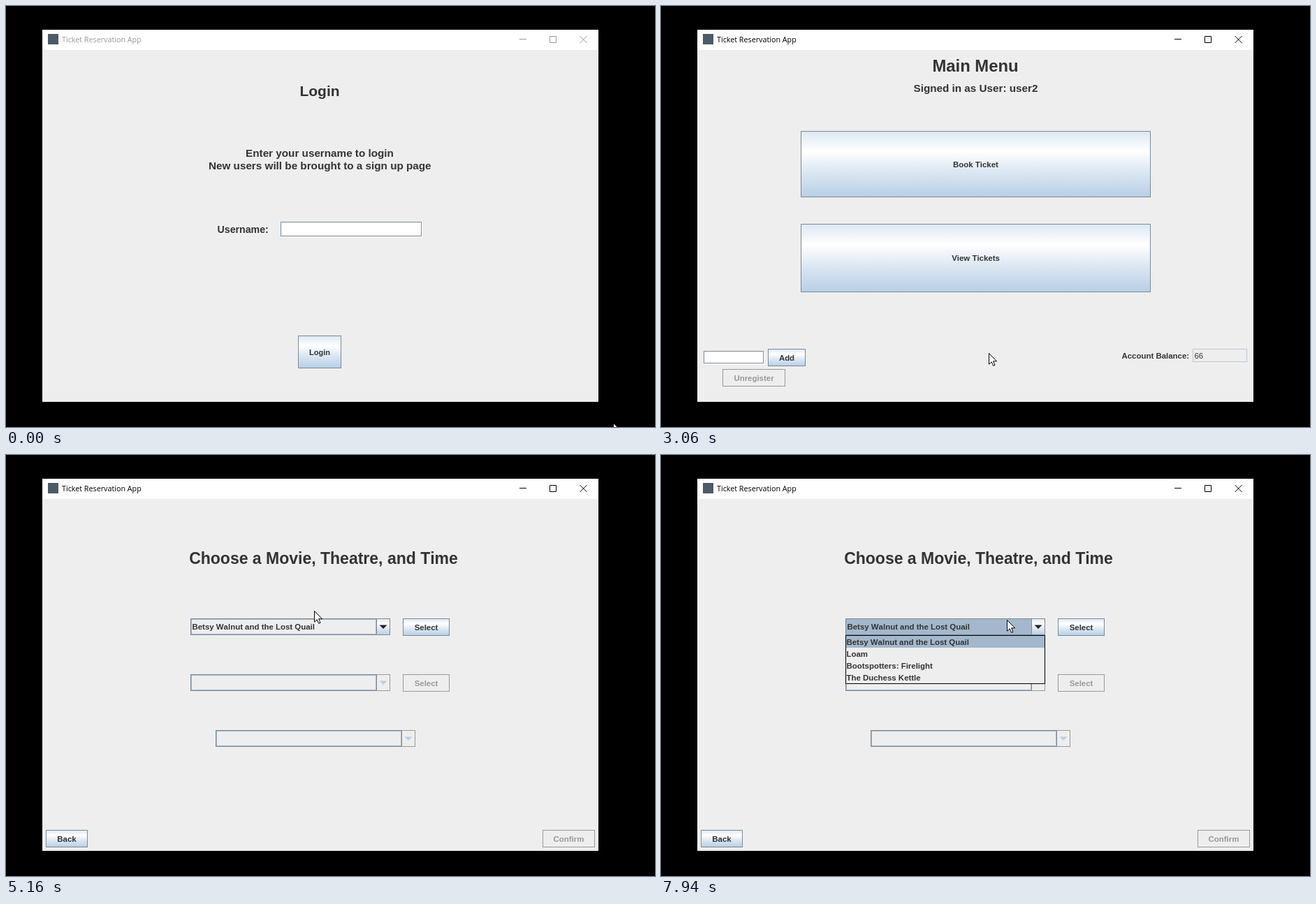
These frames come from a looping animation (929 by 603 pixels, 8 s). An HTML page:

```html
<!DOCTYPE html>
<html lang="en">
<head>
<meta charset="utf-8">
<title>Ticket Reservation App</title>
<style>
  html, body { margin: 0; width: 100%; height: 100%; overflow: hidden; background: #000; }
  svg { display: block; width: 929px; height: 603px; }
  rect { shape-rendering: crispEdges; }
  text { font: bold 11.44px "Liberation Sans", Arial, sans-serif; fill: #333; font-kerning: none; white-space: pre; }
  .caption { font: 10.75px "Open Sans", "Noto Sans", sans-serif; fill: #000; }
  .controls { fill: none; stroke: #000; }
  .inactive .caption { fill: #999; }
  .inactive .controls { stroke: #999; }
</style>
</head>
<body>
<svg id="stage" viewBox="0 0 929 603" xmlns="http://www.w3.org/2000/svg">
  <defs>
    <linearGradient id="ocean" x1="0" y1="0" x2="0" y2="1">
      <stop offset="0" stop-color="#dde8f3"/>
      <stop offset=".3" stop-color="#fff"/>
      <stop offset=".6" stop-color="#dde8f3"/>
      <stop offset="1" stop-color="#b8cfe5"/>
    </linearGradient>
  </defs>
</svg>
<script>
const LOOP = 8000, STEP = 70;
const DARK = '#7a8a99', PALE = '#b8cfe5', PICKED = '#a3b8cc', FACE = '#eee', DIM = '#999';
const TITLES = ['Betsy Walnut and the Lost Quail', 'Loam', 'Bootspotters: Firelight', 'The Duchess Kettle'];

// Pointer path: time, x, y
const PATH = [
  [0, 869, 597], [110, 357, 250], [220, 357, 250], [600, 468, 320], [2400, 468, 320],
  [2640, 426, 490], [2710, 419, 507], [2920, 469, 497], [3460, 469, 497], [3870, 444, 495],
  [4080, 441, 494], [4210, 441, 494], [4820, 445, 267], [4960, 441, 223], [5620, 441, 223],
  [5830, 440, 240], [6230, 440, 240], [6300, 438, 243], [6770, 438, 243], [6910, 505, 231],
  [7030, 578, 238], [7100, 578, 240], [7310, 530, 240], [7870, 495, 236], [LOOP, 495, 236]
];
const KEYSTROKES = [1570, 1670, 1770, 1970, 2370];

const stage = document.getElementById('stage');

function add(parent, tag, attrs = {}) {
  const node = document.createElementNS(stage.namespaceURI, tag);
  for (const name in attrs) node.setAttribute(name, attrs[name]);
  return parent.appendChild(node);
}
const group = (parent, attrs) => add(parent, 'g', attrs);
const fill = (parent, x, y, width, height, color) =>
  add(parent, 'rect', { x, y, width, height, fill: color });
// Outlined box whose border occupies the outermost pixels
const box = (parent, x, y, w, h, color, line) =>
  add(parent, 'rect', { x: x + .5, y: y + .5, width: w - 1, height: h - 1, fill: color, stroke: line });

function label(parent, x, y, string, size, anchor = 'start', style = '') {
  const node = add(parent, 'text', { x, y, 'text-anchor': anchor });
  if (size) node.style.fontSize = size + 'px';
  node.style.cssText += style;
  node.textContent = string;
  return node;
}
const centred = (parent, x, y, string, size) => label(parent, x, y, string, size, 'middle');

function button(parent, x, y, w, h, string, enabled = true, size) {
  const face = box(parent, x, y, w, h, enabled ? 'url(#ocean)' : FACE, enabled ? DARK : DIM);
  const glow = group(parent, { visibility: 'hidden' });
  box(glow, x, y, w, h, 'none', PALE);
  box(glow, x + 1, y + 1, w - 2, h - 2, 'none', '#7a9ac0');
  box(glow, x + 2, y + 2, w - 4, h - 4, 'none', PALE);
  const text = centred(parent, x + w / 2, y + h / 2 + 4.2, string, size);
  if (!enabled) text.style.fill = DIM;
  return {
    update(point, pressed) {
      const over = point[0] >= x && point[0] < x + w && point[1] > y && point[1] < y + h;
      show(glow, over && !pressed);
      face.setAttribute('fill', pressed ? PALE : 'url(#ocean)');
    }
  };
}

function combo(parent, x, y, string) {
  const on = Boolean(string);
  box(parent, x, y, 286, 24, FACE, on ? DARK : DIM);
  box(parent, x + 266, y, 20, 24, on ? 'url(#ocean)' : FACE, on ? DARK : DIM);
  box(parent, x, y, 267, 24, FACE, DARK);
  box(parent, x + 1, y + 1, 265, 22, 'none', PICKED);
  const tint = fill(parent, x + 2, y + 2, 263, 20, PICKED);
  show(tint, false);
  add(parent, 'path', { d: `M${x + 270.5} ${y + 9.5}h11l-5.5 5.5z`, fill: on ? '#222' : PALE });
  if (on) label(parent, x + 2.5, y + 16, string);
  return tint;
}

function show(node, visible) {
  node.setAttribute('visibility', visible ? 'inherit' : 'hidden');
}

// Window frame
const frame = group(stage);
fill(frame, 52, 34, 796, 533, FACE);
fill(frame, 52, 34, 796, 29, '#fff');
fill(frame, 60, 40, 15, 15, '#4d5a68');
add(frame, 'text', { x: 80, y: 52, class: 'caption' }).textContent = 'Ticket Reservation App';
add(frame, 'path', { class: 'controls', d: 'M735 47.5h10M778.5 43.5h9v9h-9zM821.5 43l10 10m0-10l-10 10' });

// Login page
const login = group(stage);
centred(login, 449, 129, 'Login', 20.97);
centred(login, 449, 216, 'Enter your username to login', 15.25);
centred(login, 449.3, 234, 'New users will be brought to a sign up page', 15.25);
label(login, 302.5, 324.5, 'Username:', 14.2);
fill(login, 394, 310, 202, 21, '#fff');
box(login, 393, 309, 202, 21, '#fff', DARK);
const typed = label(login, 394.3, 325, '', 15.25);
const caret = fill(login, 395, 311, 1, 18, '#333');
const loginButton = button(login, 418, 472, 62, 47, 'Login', true, 11);

// Main menu
const menu = group(stage);
centred(menu, 450, 94, 'Main Menu', 23.85);
centred(menu, 450.5, 122.5, 'Signed in as User: user2', 15.25);
const bookButton = button(menu, 200, 179, 501, 95, 'Book Ticket');
const viewButton = button(menu, 200, 312, 501, 98, 'View Tickets');
fill(menu, 62, 495, 86, 18, '#fff');
box(menu, 61, 494, 86, 18, '#fff', DARK);
button(menu, 153, 491, 54, 25, 'Add');
button(menu, 88, 520, 90, 25, 'Unregister', false);
label(menu, 659.5, 505, 'Account Balance:');
box(menu, 761, 491, 78, 19, FACE, '#bcc8d3');
label(menu, 763.5, 505, '66', 11.44, 'start', 'font-weight: normal');

// Booking page
const booking = group(stage);
centred(booking, 454.5, 156, 'Choose a Movie, Theatre, and Time', 23);
const tint = combo(booking, 264, 234, TITLES[0]);
combo(booking, 264, 314);
combo(booking, 300, 394);
const selectButton = button(booking, 568, 234, 67, 25, 'Select');
button(booking, 568, 314, 67, 25, 'Select', false);
button(booking, 57, 537, 60, 25, 'Back');
button(booking, 768, 537, 75, 25, 'Confirm', false);
const popup = group(booking);
box(popup, 264, 258, 286, 70, FACE, '#000');
fill(popup, 265, 259, 284, 17, PICKED);
TITLES.forEach((title, i) => label(popup, 265.5, 272 + 17.1 * i, title));

// Pointers
const arrow = add(stage, 'path', {
  d: 'M.5 .5V16.2L4.2 12.8L6.7 18.3L9 17.3L6.6 11.8H11.6Z', fill: '#fff', stroke: '#000'
});
const beam = add(stage, 'path', { d: 'M-3 -8.5h2.5l.5 .5l.5 -.5h2.5M.5 -8v16M-3 8.5h2.5l.5 -.5l.5 .5h2.5', fill: 'none', stroke: '#000' });

function pointerAt(time) {
  const t = Math.max(0, time);
  const i = PATH.findIndex((key, n) => n && t < key[0]);
  const [t0, x0, y0] = PATH[i - 1], [t1, x1, y1] = PATH[i];
  const part = Math.floor((t - t0) / STEP) * STEP / (t1 - t0);
  return [Math.round(x0 + (x1 - x0) * part), Math.round(y0 + (y1 - y0) * part)];
}

const start = performance.now();

function draw(now) {
  const t = Math.max(0, now - start) % LOOP;
  const during = (from, to) => t >= from && t < to;
  const [x, y] = pointerAt(t);
  const hover = pointerAt(t - STEP);

  frame.setAttribute('class', t < 670 ? 'inactive' : '');
  show(login, t < 3060);
  show(menu, during(3060, 5160));
  show(booking, t >= 5160);

  typed.textContent = 'user2'.slice(0, KEYSTROKES.filter(k => k <= t).length);
  const width = typed.textContent ? typed.getComputedTextLength() : 0;
  caret.setAttribute('x', Math.round(395 + width));
  show(caret, during(670, 1170) || during(1570, 2870));

  loginButton.update(hover, during(2980, 3060));
  bookButton.update(hover, during(5090, 5160));
  viewButton.update(hover, false);
  selectButton.update(hover, false);
  show(popup, during(6100, 6770) || t >= 7940);
  show(tint, during(6030, 6200) || t >= 6770);

  const inField = t < 3060 && x > 393 && x < 595 && y > 309 && y < 330;
  show(arrow, !inField);
  show(beam, inField);
  for (const shape of [arrow, beam]) shape.setAttribute('transform', `translate(${x} ${y})`);
  requestAnimationFrame(draw);
}
draw(start);
</script>
</body>
</html>
```
